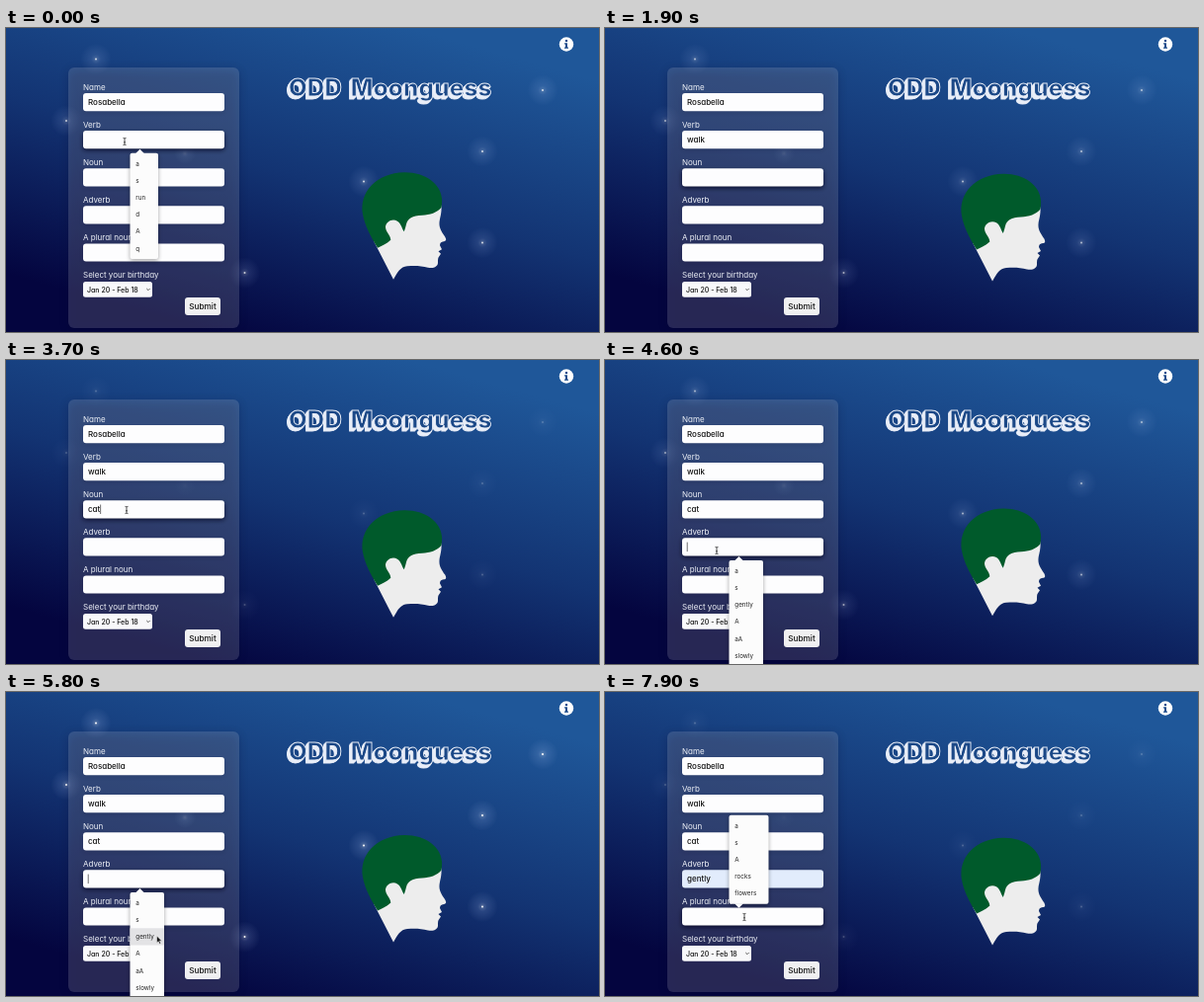
These frames come from a looping animation (600x308 px, 8000 ms). An HTML page:

```html
<!DOCTYPE html>
<html lang="en">
<head>
<meta charset="utf-8">
<title>Word game form</title>
<style>
html, body { margin: 0; width: 100%; height: 100%; overflow: hidden; background: #0d2460; }
svg { display: block; width: 600px; height: 308px; font-family: Inter, "Open Sans", sans-serif; }
.form { font-size: 8px; font-feature-settings: "cv11"; }
.label { fill: #eef1f8; }
.value { fill: #111; font-weight: 500; }
.small { font-size: 7px; }
.item { font-size: 6.3px; fill: #222; }
.title { font-size: 24px; font-weight: 800; letter-spacing: .3px; word-spacing: 3px; }
</style>
</head>
<body>
<svg id="stage" viewBox="0 0 600 308">
  <defs>
    <linearGradient id="sky" gradientUnits="userSpaceOnUse" x1="365" y1="-12" x2="270" y2="325">
      <stop offset="0" stop-color="#1f5799"/>
      <stop offset=".5" stop-color="#133473"/>
      <stop offset="1" stop-color="#04053f"/>
    </linearGradient>
    <radialGradient id="glow">
      <stop offset="0" stop-color="#fff" stop-opacity=".3"/>
      <stop offset=".3" stop-color="#bcd0ff" stop-opacity=".14"/>
      <stop offset="1" stop-color="#bcd0ff" stop-opacity="0"/>
    </radialGradient>
    <filter id="soft" x="-20%" y="-60%" width="140%" height="260%">
      <feGaussianBlur stdDeviation="2.2"/>
    </filter>
    <filter id="wide" x="-10%" y="-10%" width="120%" height="120%">
      <feGaussianBlur stdDeviation="5"/>
    </filter>
  </defs>
  <rect width="600" height="308" fill="url(#sky)"/>
  <g id="stars"></g>

  <g id="title" class="title"></g>

  <circle cx="567" cy="16.5" r="7.2" fill="#fff"/>
  <circle cx="567" cy="13" r="1.25" fill="#1b4b8b"/>
  <path d="M565 15.3h3v4.2h1v1.3h-4v-1.3h1v-2.9h-1z" fill="#1b4b8b"/>

  <g id="head">
    <path fill="#ededed" d="M372 214L392 253C396 246 399 240 406 239.500C413 239 420 239 427 241C433 242 437 240 437 236C437 233 437 231 438 230L440 227L437.500 224.500L441 222.500L439 218.500C439 216 440 215 443 214.500C446 214 445.500 212 444 209.500C441 205 438 201 438.500 195C439 190 441 186 440.500 178L410 160L372 180Z"/>
    <path fill="#005a2b" d="M376 221C369 210 363 198 361 187C357 164 375 145 403 144.300C424 144 440 156 441 171C441.300 175 440.800 178 440.500 180C436 185.500 429 187.500 421 188C411 188.500 406.500 191 405 197C404.300 200 403.500 203 402.700 204.500C400.500 201 400 196.500 396 193.800C391 190.500 384 194.500 384 200C384.200 205 389 208 389.300 213C385 217 380 219 376 221Z"/>
  </g>

  <rect x="63" y="42" width="173" height="264" rx="6" fill="#020420" opacity=".22" filter="url(#wide)"/>
  <rect x="63" y="40" width="173" height="264" rx="6" fill="#fff" fill-opacity=".14"/>
  <circle id="blurred" cx="181" cy="127" r="11" fill="url(#glow)"/>

  <g id="form" class="form"></g>
  <g id="menu"></g>
  <g id="pointer">
    <path id="arrow" d="M0 0V7.200L1.700 5.700L2.900 8.300L4.200 7.700L3 5.200H5.200Z" fill="#161616" stroke="#eee" stroke-width=".6"/>
    <path id="beam" d="M-1.500 -3.600Q0 -3.600 0 -2.800Q0 -3.600 1.500 -3.600M0 -2.800V2.800M-1.500 3.600Q0 3.600 0 2.800Q0 3.600 1.500 3.600M-.9 .8H.9" fill="none" stroke="#222" stroke-width=".8"/>
  </g>
</svg>
<script>
const LOOP = 8000, ROW = 17.2, MENU_X = 125.5;
const $ = id => document.getElementById(id);

function add(parent, tag, attrs, text) {
  const el = document.createElementNS("http://www.w3.org/2000/svg", tag);
  for (const k in attrs) el.setAttribute(k, attrs[k]);
  if (text) el.textContent = text;
  parent.appendChild(el);
  return el;
}
const show = (el, on) => { el.style.display = on ? "" : "none"; };
const fieldTop = i => 66 + 38.1 * i;

// Steps are [time, value, ...]; the last one reached holds.
const at = (steps, t) => steps.reduce((hit, s) => s[0] <= t ? s : hit, steps[0]);

const starSpots = [[91, 31.5], [61, 94], [362, 155.5], [482, 125], [543, 63], [482, 217.5], [241.5, 248]];
for (const [cx, cy] of starSpots) {
  add($("stars"), "circle", { cx, cy, r: 16, fill: "url(#glow)" });
  add($("stars"), "circle", { cx, cy, r: 1, fill: "#fff" });
}

const titleText = "ODD Moonguess";
for (let d = 2.5; d > 0; d -= .5)
  add($("title"), "text", { x: 286 - d, y: 69 + d, fill: "#e9eef8", stroke: "#e9eef8", "stroke-width": .9 }, titleText);
add($("title"), "text", { x: 286, y: 69, fill: "#1b4887", stroke: "#e9eef8", "stroke-width": .9 }, titleText);

const form = $("form");
const labels = ["Name", "Verb", "Noun", "Adverb", "A plural noun", "Select your birthday"];
const fields = labels.map((name, i) => {
  const y = fieldTop(i);
  add(form, "text", { class: "label", x: 78, y: y - 3.3 }, name);
  if (i === 5) return null;
  const shade = add(form, "rect", { x: 78, y: y + 2, width: 143, height: 18, rx: 3, fill: "#03051f", filter: "url(#soft)" });
  const box = add(form, "rect", { x: 78, y, width: 143, height: 18.2, rx: 3 });
  const text = add(form, "text", { class: "value", x: 83, y: y + 12.1 });
  return { shade, box, text };
});
add(form, "rect", { x: 78, y: 257, width: 70, height: 15.8, rx: 2.5, fill: "#f8f8fa" });
add(form, "text", { class: "value small", x: 82, y: 267.5 }, "Jan 20 - Feb 18");
add(form, "path", { d: "M142.300 264l1.700 1.700l1.700 -1.700", fill: "none", stroke: "#333", "stroke-width": .8 });
add(form, "rect", { x: 181, y: 273, width: 36, height: 18, rx: 3, fill: "#f0f0f1" });
add(form, "text", { class: "value", x: 199, y: 285, "text-anchor": "middle", style: "font-size:8.2px" }, "Submit");
const caret = add(form, "rect", { width: .7, height: 9.5, fill: "#333" });

const typed = [
  [[0, "Rosabella"]],
  [[0, ""], [1000, "wa"], [1200, "wal"], [1400, "walk"]],
  [[0, ""], [3000, "c"], [3200, "ca"], [3400, "cat"]],
  [[0, ""], [6200, "gently"]],
  [[0, ""]]
];
const focus = [[0, 1], [1900, 2], [4200, 3], [7300, 4]];

const menus = [
  { from: 0, to: 700, field: 1, w: 28.5, items: ["a", "s", "run", "d", "A", "q"] },
  { from: 700, to: 1400, field: 1, w: 28.5, items: ["walk"] },
  { from: 2200, to: 3000, field: 2, w: 22.8, items: ["a", "s", "d", "A", "q", "dd"] },
  { from: 4300, to: 6200, field: 3, w: 34.5, items: ["a", "s", "gently", "A", "aA", "slowly"], pick: 2 },
  { from: 7400, to: LOOP, field: 4, w: 40, items: ["a", "s", "A", "rocks", "flowers"], above: true }
];
for (const m of menus) {
  const h = m.items.length * ROW + 4, fy = fieldTop(m.field);
  const y = m.above ? fy - 3.6 - h : fy + 22.6;
  const tip = m.above ? `M131 ${y + h - .5}l4.500 4.500l4.500 -4.500z` : `M131 ${y + .5}l4.500 -4.500l4.500 4.500z`;
  m.el = add($("menu"), "g", {});
  add(m.el, "rect", { x: MENU_X, y: y + 1.5, width: m.w, height: h, rx: 2, fill: "#000", opacity: .35, filter: "url(#soft)" });
  add(m.el, "path", { d: tip, fill: "#fcfcfc" });
  add(m.el, "rect", { x: MENU_X, y, width: m.w, height: h, rx: 2, fill: "#fcfcfc" });
  m.items.forEach((name, i) => {
    const top = y + 2 + ROW * i;
    if (i === m.pick)
      m.mark = add(m.el, "rect", { x: MENU_X, y: top, width: m.w, height: ROW, fill: "#e3e3e5" });
    add(m.el, "text", { class: "item", x: 131.3, y: top + 10.8 }, name);
  });
}

const path = [
  [0, 120, 115], [3700, 122, 152], [4200, 113, 193], [4900, 113, 193], [5500, 152.5, 247],
  [6200, 152.5, 247], [6600, 142.5, 205.5], [6800, 142, 209], [7100, 141, 228], [LOOP, 141, 228]
];
function pointerAt(t) {
  const i = Math.max(1, path.findIndex(p => p[0] > t));
  const [a, b] = [path[i - 1], path[i]];
  const u = (t - a[0]) / (b[0] - a[0]), e = u * u * (3 - 2 * u);
  return [a[1] + (b[1] - a[1]) * e, a[2] + (b[2] - a[2]) * e];
}

function wave(t, period, peak) {
  return .5 + .5 * Math.cos(2 * Math.PI * (t - peak) / period);
}

function draw(t) {
  $("head").setAttribute("transform", `translate(0 ${9 * wave(t, 3000, 1050)})`);
  const shine = .2 + .8 * wave(t, 5000, 800);
  $("stars").setAttribute("opacity", shine);
  $("blurred").setAttribute("opacity", shine * .6);

  const active = at(focus, t)[1];
  fields.slice(0, 5).forEach((f, i) => {
    const value = at(typed[i], t)[1];
    if (f.text.textContent !== value) f.text.textContent = value;
    f.shade.setAttribute("opacity", i === active ? .75 : .15);
    f.box.setAttribute("fill", i === 3 && value ? "#e2ecfc" : "#fdfdfe");
  });

  const line = fields[active].text;
  const width = line.textContent ? line.getComputedTextLength() + .3 : 0;
  caret.setAttribute("x", 82.8 + width);
  caret.setAttribute("y", fieldTop(active) + 4.3);
  show(caret, t >= 1000 && (t + 500) % 1000 < 400 && t < 7400);

  const [x, y] = pointerAt(t);
  for (const m of menus) {
    show(m.el, t >= m.from && t < m.to);
    if (m.mark) show(m.mark, x > MENU_X && y > 238 && y < 256);
  }

  const inField = [0, 1, 2, 3, 4].some(i => y > fieldTop(i) && y < fieldTop(i) + 18.2);
  const overMenu = t >= 4300 && t < 6200 && x > MENU_X && y > 203;
  const beam = inField && !overMenu;
  $("pointer").setAttribute("transform", `translate(${x} ${y})`);
  show($("pointer"), t < 700 || t >= 3700);
  show($("beam"), beam);
  show($("arrow"), !beam);
}

const start = performance.now();
function tick() {
  draw((performance.now() - start) % LOOP);
  requestAnimationFrame(tick);
}
tick();
</script>
</body>
</html>
```
